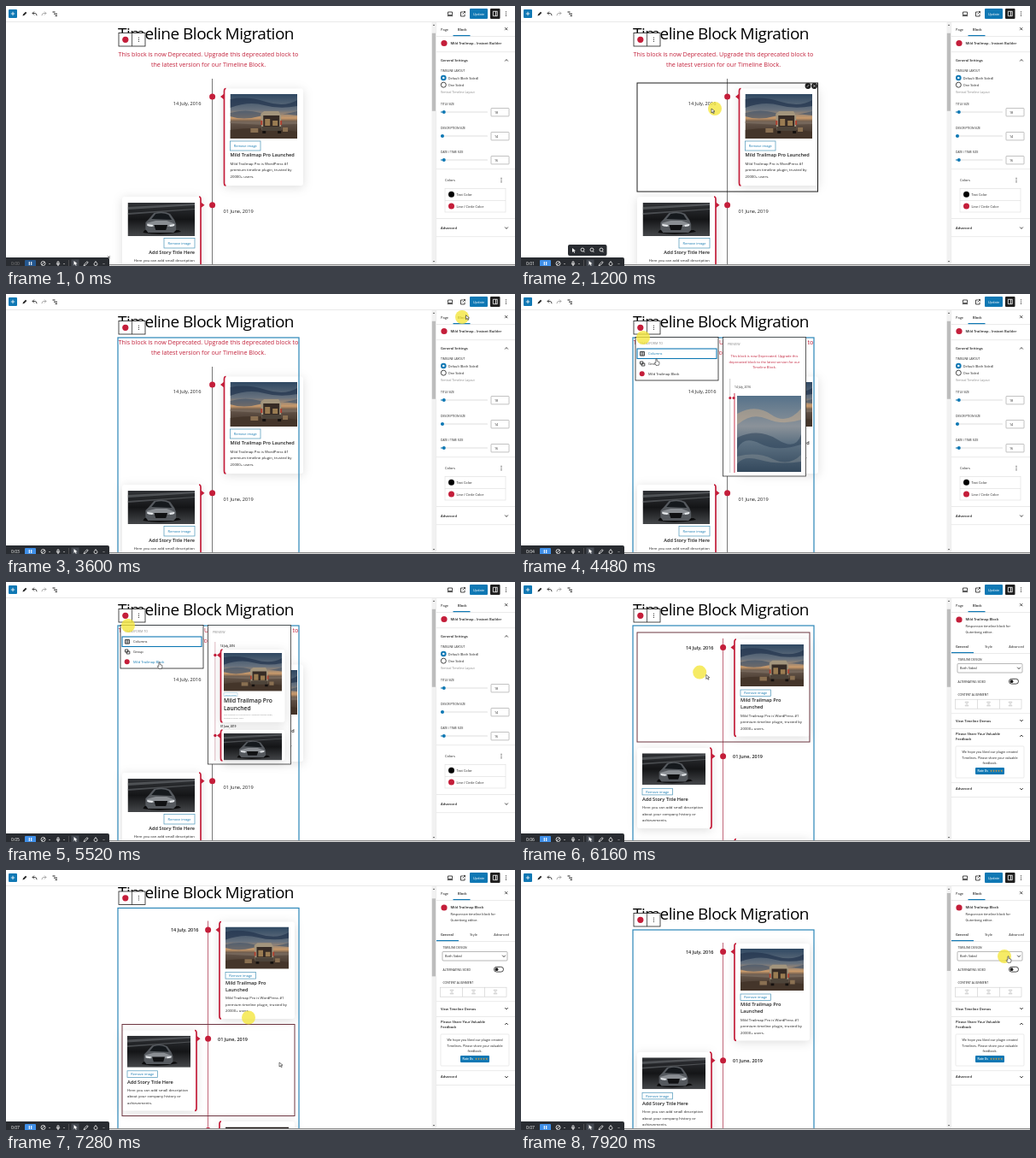
An HTML page for the animation above (8 s loop, 596x304 px).

```html
<!DOCTYPE html>
<html lang="en">
<head>
<meta charset="utf-8">
<title>Timeline Block Migration</title>
<style>
html, body { margin: 0; width: 100%; height: 100%; overflow: hidden; background: #fff; }
svg#stage { display: block; width: 596px; height: 304px; font-family: 'Open Sans', 'Noto Sans', sans-serif; fill: #1e1e1e; --scroll: 19px; }
text { white-space: pre; }
.b { font-weight: 600; }
.e { text-anchor: end; }
.m { text-anchor: middle; }
.red { fill: #c2203a; }
.blue { fill: #1178b0; }
.grey { fill: #858585; }
.white { fill: #fff; }
.line { fill: none; stroke: #1e1e1e; stroke-width: .8; }
.card { filter: drop-shadow(0 2px 6px #0002); }
.title { letter-spacing: -.5px; fill: #000; }
.page { transform: translateY(calc(0px - var(--scroll))); }
.tools { transform: translateY(max(23px, calc(50.5px - var(--scroll)))); }
.thumb { transform: translateY(calc(27px + var(--scroll) * .25)); }
</style>
</head>
<body>
<svg id="stage" viewBox="0 0 596 304">
  <defs>
    <clipPath id="canvas"><rect y="19" width="498.5" height="283"/></clipPath>
    <linearGradient id="dusk" x2="0" y2="1">
      <stop stop-color="#2f4862"/><stop offset=".35" stop-color="#66717e"/>
      <stop offset=".54" stop-color="#c99a6b"/><stop offset=".62" stop-color="#65564b"/>
      <stop offset="1" stop-color="#3a2c22"/>
    </linearGradient>
    <linearGradient id="cloud" x2="0" y2="1">
      <stop stop-color="#56728a"/><stop offset=".4" stop-color="#8b9299"/>
      <stop offset=".62" stop-color="#5d7182"/><stop offset="1" stop-color="#33485c"/>
    </linearGradient>
    <linearGradient id="garage" x2="0" y2="1">
      <stop stop-color="#303236"/><stop offset=".5" stop-color="#141517"/><stop offset="1" stop-color="#45474a"/>
    </linearGradient>
    <symbol id="van" viewBox="0 0 79 52" preserveAspectRatio="none">
      <rect width="79" height="52" fill="url(#dusk)"/>
      <path d="M0 6Q20 2 42 9T79 7V14Q58 18 40 13T0 16Z" fill="#25364f" opacity=".75"/>
      <path d="M0 22Q18 17 36 22T79 20V25Q52 21 34 26T0 26Z" fill="#46566a" opacity=".7"/>
      <path d="M0 32H79V35L40 36L0 34Z" fill="#75665a"/>
      <path d="M0 42Q30 37 79 44V52H0Z" fill="#44352a"/>
      <path d="M36 23L40 20H57L60 25V42H37Z" fill="#a3957d"/>
      <path d="M39 25H58V38H39Z" fill="#362b25"/>
      <path d="M41 29h6v8h-6zM50 31h6v6h-6z" fill="#9a7c52"/>
      <path d="M37 38H60V43H37Z" fill="#4d443a"/>
      <path d="M36 31h2v5h-2zM59 31h2v5h-2z" fill="#b0402f"/>
      <path d="M24 40h9v5h-9zM62 39h6v5h-6z" fill="#8a7052"/>
      <path d="M38 43h4v3h-4zM56 43h4v3h-4z" fill="#15110f"/>
    </symbol>
    <symbol id="car" viewBox="0 0 79 39" preserveAspectRatio="none">
      <rect width="79" height="39" fill="url(#garage)"/>
      <path d="M0 5L79 1V3L0 8ZM0 12L79 7V8L0 14Z" fill="#777a7f" opacity=".5"/>
      <path d="M18 35Q40 39 63 34L60 32H20Z" fill="#0b0b0c"/>
      <path d="M21 23L25 19L31 12Q42 9 50 13L55 20L57 25V32L54 35H24L21 31Z" fill="#55595e"/>
      <path d="M28 19L33 13Q42 11 48 14L52 20Z" fill="#15191d"/>
      <path d="M22 24L33 21H46L56 25L53 28H25Z" fill="#8a8e93"/>
      <path d="M31 26H47L45 32H33Z" fill="#101113"/>
      <path d="M23 25l7 1-1 2-6-1zM49 26l6-1v2l-5 1z" fill="#e6e9ec"/>
    </symbol>
    <symbol id="portrait" viewBox="0 0 74 37" preserveAspectRatio="none">
      <rect width="74" height="37" fill="#160f0d"/>
      <path d="M20 37Q22 12 38 10T55 37Z" fill="#4a281b"/>
      <ellipse cx="37" cy="27" rx="8" ry="11" fill="#7a4c37"/>
    </symbol>
  </defs>
</svg>
<script>
const INK = '#1e1e1e', BLUE = '#0f78b4', RED = '#c41e3a';

const text = (x, y, size, str, cls = '') => `<text x="${x}" y="${y}" font-size="${size}" class="${cls}">${str}</text>`;
const lines = (x, y, step, size, rows, cls) => rows.map((row, i) => text(x, y + i * step, size, row, cls)).join('');
const rect = (x, y, w, h, fill = 'none', extra = '') => `<rect x="${x}" y="${y}" width="${w}" height="${h}" fill="${fill}" ${extra}/>`;
const frame = (x, y, w, h, color = INK, width = .8, extra = '') => rect(x, y, w, h, '#fff', `stroke="${color}" stroke-width="${width}" ${extra}`);
const outline = (x, y, w, h, color = INK, width = 1) => rect(x, y, w, h, 'none', `stroke="${color}" stroke-width="${width}"`);
const dot = (x, y, r, fill = INK, extra = '') => `<circle cx="${x}" cy="${y}" r="${r}" fill="${fill}" ${extra}/>`;
const path = (d, extra = 'class="line"') => `<path d="${d}" ${extra}/>`;
const image = (id, x, y, w, h) => `<use href="#${id}" x="${x}" y="${y}" width="${w}" height="${h}"/>`;
const rule = y => rect(504, y, 92, .6, '#ddd');
const chevron = (x, y, dir = 1) => path(`M${x - 1.8} ${y - dir}l1.8 ${2 * dir}l1.8 ${-2 * dir}`);
const kebab = (x, y) => [-2.2, 0, 2.2].map(d => dot(x, y + d, .6)).join('');
const mark = (x, y) => dot(x, y, 3.6, RED);
const at = (x, y, body) => `<g transform="translate(${x} ${y})">${body}</g>`;
// Visible between two percentages of the loop
const show = (from, to, body) => `<g data-show="${from} ${to}">${body}</g>`;

// side 1 puts the accent on the left edge, -1 on the right edge
function card(x, y, w, h, side, tipY) {
  const edge = side > 0 ? x : x + w;
  return rect(x, y, w, h, '#fff', 'rx="3" class="card"') +
    path(`M${edge + 2 * side} ${y}q${-2 * side} 0 ${-2 * side} 3v${h - 6}q0 3 ${2 * side} 3`, `fill="none" stroke="${RED}" stroke-width="1.7"`) +
    path(`M${edge} ${tipY - 3.5}l${-4.5 * side} 3.5l${4.5 * side} 3.5z`, `fill="${RED}"`);
}
const button = (x, y, w, h) => frame(x, y, w, h, '#4b94b8', .7) + text(x + w / 2, y + h / 2 + 1.4, 3.95, 'Remove image', 'm blue');

const proText = ['Mild Trailmap Pro is WordPress #1', 'premium timeline plugin, trusted by', '20000+ users.'];
const storyText = ['Here you can add small description', 'about your company history or', 'achievements.'];

const oldBlock =
  lines(237, 59, 11.8, 7.15, ['This block is now Deprecated. Upgrade this deprecated block to', 'the latest version for our Timeline Block.'], 'm red') +
  rect(241.2, 85, .8, 240, '#555') +
  dot(241.6, 106, 3.5, RED) + text(228.5, 115.5, 5.65, '14 July, 2016', 'e') +
  card(255.5, 96.5, 92.5, 113.5, 1, 106) + image('van', 262.5, 103, 78.5, 52) + button(262.5, 158, 35.5, 11) +
  text(262.5, 176, 5.6, 'Mild Trailmap Pro Launched', 'b') + lines(262.5, 185.8, 7.6, 4.3, proText) +
  dot(241.6, 232.8, 3.5, RED) + text(254.5, 242, 5.65, '01 June, 2019') +
  card(136, 223, 92, 100, -1, 232.8) + image('car', 142.5, 230, 78.5, 39) + button(185, 271.5, 36, 11.5) +
  text(221, 290, 5.6, 'Add Story Title Here', 'b e') + lines(221, 299, 7.6, 4.35, storyText, 'e') +
  show(12, 19, outline(136, 90, 211.5, 127) + dot(336, 93.5, 3.4) + dot(343.5, 93.5, 3.4) +
    path('M334.8 94.7l2.4-2.4M342.3 92.3l2.4 2.4m0-2.4l-2.4 2.4', 'stroke="#fff" stroke-width=".7"'));

const newBlock =
  rect(236.1, 85, .9, 320, '#b9566b') +
  dot(236.6, 95.5, 3.5, RED) + text(225.5, 97.5, 5.5, '14 July, 2016', 'b e') +
  card(250, 86, 88, 113.5, 1, 95.5) + image('van', 257, 92, 74, 49) + button(257, 145, 35.5, 7.6) +
  lines(257, 159.3, 7.9, 5.6, ['Mild Trailmap Pro', 'Launched'], 'b') + lines(257, 176.8, 7.5, 4.3, proText) +
  dot(236.6, 222.8, 3.5, RED) + text(248, 225, 5.5, '01 June, 2019', 'b') +
  card(136, 213, 87, 94, -1, 222.8) + image('car', 142, 219.3, 74, 37) + button(142, 260.3, 35.5, 7.6) +
  text(142, 275.2, 5.6, 'Add Story Title Here', 'b') + lines(142, 284, 7.5, 4.35, storyText) +
  dot(236.6, 330, 3.5, RED) + text(225.5, 332, 5.5, '11/Oct/2000', 'b e') +
  card(250, 319.5, 88, 100, 1, 330) + image('portrait', 257, 326, 74, 37) +
  show(76, 90, outline(136, 78, 202, 128, '#6d3641')) + show(90, 95, outline(136, 206, 202, 107, '#6d3641'));

const canvas = `<g clip-path="url(#canvas)"><g class="page">` +
  text(131, 58.4, 19, 'Timeline Block Migration', 'title') +
  show(0, 72, at(0, 19, oldBlock)) + show(72, 100, newBlock) +
  show(21, 100, outline(131, 70, 212, 400, '#2b86b8', 1.2)) + `</g>
  <g class="tools">` + frame(132, 0, 31, 15.5) + rect(147.3, 0, .7, 15.5, INK) + mark(139.8, 7.8) + kebab(155.5, 7.8) + `</g></g>`;

const scrollbar = rect(498.5, 19, 5, 283, '#f1f1f1') + `<g class="thumb">${rect(498.8, 0, 4.2, 91, '#bdbdbd')}</g>` +
  path('M499.8 23l1.2-1.6l1.2 1.6zM499.8 298l1.2 1.6l1.2-1.6z', 'fill="#555"') + rect(503.6, 19, .6, 283, '#ddd');

const header = rect(0, 0, 596, 18.5, '#fff') + rect(0, 18.4, 596, .6, '#ddd') +
  rect(3, 4, 10, 10, BLUE, 'rx="1"') + path('M8 6.8v4.4M5.8 9h4.4', 'stroke="#fff" stroke-width=".8"') +
  path('M19.5 11.5l.5-1.8l3-3l1.3 1.3l-3 3z', `fill="${INK}"`) +
  path('M33 6.5l-2 2l2 2M31 8.5h3q2 0 2 2.8') + path('M45 6.5l2 2l-2 2M47 8.5h-3q-2 0-2 2.8', 'fill="none" stroke="#999" stroke-width=".8"') +
  path('M54.5 7h3M56 9.2h4M57.5 11.4h2.5', `stroke="${INK}" stroke-width="1"`) +
  path('M517.5 7h5v3.6h-5zM516.8 11.6h6.4') + path('M535 7h-2.5v5h4.6v-2.4M534.6 9.4l2.8-2.8M535.5 6.4h2v2') +
  rect(543, 3, 21, 12, BLUE, 'rx="1"') + text(553.5, 10.6, 4, 'Update', 'm white') +
  rect(567, 3, 11.5, 12, INK, 'rx="1"') + path('M570.3 6.3h5v5.4h-5zM573.5 6.3v5.4', 'fill="none" stroke="#fff" stroke-width=".8"') + kebab(585.5, 9);

const slider = (y, label, knob, value) => text(509, y, 3.4, label) +
  rect(509, y + 8, 55, 1, '#ddd', 'rx=".5"') + rect(509, y + 8, knob - 509, 1, BLUE) + dot(knob, y + 8.5, 2, BLUE) +
  frame(568, y + 4, 21, 9.4, '#999', .6, 'rx=".6"') + text(572, y + 10.1, 3.7, value);

const oldPanel = mark(513, 43.5) + text(520.5, 45, 4.1, 'Mild Trailmap - Instant Builder', 'b') + rule(53.5) +
  text(509, 65, 4, 'General Settings', 'b') + chevron(586, 63.5, -1) +
  text(509, 77, 3.4, 'TIMELINE LAYOUT') +
  dot(512.3, 84, 3.3, BLUE) + dot(512.3, 84, 1.3, '#fff') + text(517.8, 85.5, 3.8, 'Default (Both Sided)') +
  dot(512.3, 92.2, 3, 'none', 'class="line"') + text(517.8, 93.7, 3.8, 'One Sided') +
  text(509, 102, 3.6, 'Vertical Timeline Layout', 'grey') +
  slider(115.5, 'TITLE SIZE', 512.8, '18') + slider(143.5, 'DESCRIPTION SIZE', 511, '14') + slider(171.5, 'DATE / TIME SIZE', 512.8, '16') +
  rule(190.5) + text(514, 205, 4, 'Colors') + kebab(580, 203.5) +
  frame(514, 213.5, 71, 27.5, '#ddd', .6) + rect(514, 227, 71, .6, '#ddd') +
  dot(521.5, 220.3, 3.5, '#000') + text(527.5, 222, 3.9, 'Text Color') +
  dot(521.5, 234, 3.5, RED) + text(527.5, 235.5, 3.9, 'Line / Circle Color') +
  rule(248) + text(509, 261, 4, 'Advanced', 'b') + chevron(586, 259.5) + rule(269.5);

const alignIcon = x => path(`M${x - 2.2} 140.5h4.4M${x - 1.4} 142.6h2.8M${x - 2.2} 144.7h4.4`, 'stroke="#aaa" stroke-width=".7"');
const newPanel = mark(513, 44) + text(520.5, 45.3, 4.1, 'Mild Trailmap Block', 'b') +
  lines(520.5, 53, 6.7, 3.85, ['Responsive timeline block for', 'Gutenberg editor.']) +
  text(509, 76.7, 3.9, 'General', 'b') + text(547.5, 76.7, 3.9, 'Style', 'm') + text(589, 76.7, 3.9, 'Advanced', 'e') +
  rule(83) + rect(504, 82, 26, 1.2, BLUE) +
  text(511.5, 92, 3.4, 'TIMELINE DESIGN') + frame(511, 95.5, 76, 10.5, '#888', .6, 'rx="1"') + text(514, 102.2, 3.9, 'Both Sided') + chevron(583, 100.7) +
  text(511.5, 117.5, 3.4, 'ALTERNATING SIDED') + frame(571.5, 113.3, 11, 5.8, INK, .8, 'rx="2.9"') + dot(574.5, 116.2, 1.9) +
  text(511.5, 133, 3.4, 'CONTENT ALIGNMENT') + frame(508.5, 137.2, 77.5, 11, '#ccc', .6) +
  rect(534.3, 137.2, .6, 11, '#ccc') + rect(560.2, 137.2, .6, 11, '#ccc') + [522, 547.5, 573].map(alignIcon).join('') +
  rule(153.5) + text(509, 163.7, 4, 'View Timeline Demos', 'b') + chevron(586, 162) + rule(171) +
  lines(509, 179.2, 6, 4, ['Please Share Your Valuable', 'Feedback'], 'b') + chevron(586, 180, -1) +
  frame(509, 192, 80, 37, '#ddd', .6, 'rx="1"') +
  lines(549, 200.4, 6.2, 3.75, ['We hope you liked our plugin created', 'Timelines. Please share your valuable', 'feedback.'], 'm') +
  rect(532, 217, 34, 8, BLUE, 'rx="1"') + text(534.5, 222.3, 3.4, 'Rate Us', 'b white') +
  `<text x="549" y="222.3" font-size="3.4" fill="#f5a030" font-family="DejaVu Sans, sans-serif">★★★★★</text>` +
  rule(234.5) + text(509, 243.4, 4, 'Advanced', 'b') + chevron(586, 242) + rule(251);

const panel = rect(504.2, 19, 92, 283, '#fff') + text(509, 28.5, 4, 'Page') + text(529, 28.5, 4, 'Block', 'b') +
  path('M584.2 25.2l3 3m0-3l-3 3') + rule(35) + rect(523.5, 34, 20, 1.2, BLUE) +
  show(0, 72, oldPanel) + show(72, 100, newPanel);

const menuItem = (y, label, from, to) => text(149, y, 4, label) + show(from, to, rect(148, y - 4, 55, 5.5, '#fff') + text(149, y, 4, label, 'blue'));
const menu = frame(134, 50.5, 97, 50.5) + text(139, 58.7, 3.6, 'TRANSFORM TO', 'grey') +
  path('M139.5 67.5h5v4.6h-5zM141.2 67.5v4.6M142.9 67.5v4.6') + path('M139.5 79h3.4v3h-3.4zM141.2 81h3.6v3h-3.6z') +
  dot(141.7, 93.2, 3, RED) +
  menuItem(71.4, 'Columns', 53, 60) + menuItem(83.2, 'Group', 60, 64) + menuItem(94.8, 'Mild Trailmap Block', 64, 72) +
  outline(136, 64, 93, 11.5, BLUE, 1.1);

const columnsPreview =
  lines(285, 74, 6.6, 3.95, ['This block is now Deprecated. Upgrade this', 'deprecated block to the latest version for our', 'Timeline Block.'], 'm red') +
  text(250, 110, 3.3, '14 July, 2016') + rect(244.6, 99, .5, 110, '#999') + rect(249.5, 116, .9, 93, RED) +
  dot(244.8, 121.5, 1.5, RED) + dot(249, 121.5, 1.5, RED) +
  rect(253, 119, 75, 89, 'url(#cloud)') +
  path('M253 140Q275 128 293 141T328 134V147Q306 154 288 146T253 153Z', 'fill="#d2b28c" opacity=".45"') +
  path('M253 168Q278 156 300 170T328 164V176Q300 185 280 175T253 182Z', 'fill="#263d54" opacity=".5"') +
  path('M253 190Q276 184 295 193T328 188V196Q300 200 280 194T253 199Z', 'fill="#91999c" opacity=".4"');

const blockPreview =
  rect(244.6, 70, .6, 139, '#c78794') + text(251, 76, 2.9, '14 July, 2016', 'b') + dot(244.9, 85.5, 1.7, RED) +
  card(251.5, 79, 75, 85, 1, 85.5) + image('van', 255, 83, 68, 44.5) +
  frame(255, 129.8, 16, 3.7, '#75adc8', .4) + text(263, 132.6, 1.9, 'Remove image', 'm blue') +
  lines(255, 141.3, 8.6, 6.7, ['Mild Trailmap Pro', 'Launched'], 'b') +
  lines(255, 156, 3.7, 2.05, ['Mild Trailmap Pro is WordPress #1 premium timeline plugin,', 'trusted by 20000+ users.'], 'grey') +
  text(251, 169.8, 2.9, '01 June, 2019', 'b') + dot(244.9, 179.5, 1.7, RED) +
  card(251.5, 173, 75, 36, 1, 179.5) + image('car', 255, 177, 68, 31.5);

const popover = show(52, 72, menu +
  frame(236.5, 50.5, 97, 162.5, '#333') + text(242, 60, 3.5, 'PREVIEW', 'grey') +
  show(52, 64, columnsPreview) + show(64, 72, blockPreview));

const icon = (d, color = '#e4e4e4') => path(d, `fill="none" stroke="${color}" stroke-width=".9"`);
const arrow = 'l0 5l1.3-1.2l1 2l.9-.5l-1-1.9l1.8-.2z';
const recorder = rect(0, 302.3, 596, .9, '#555') + rect(-3, 294, 124, 12, '#292c31', 'rx="2"') +
  show(0, 1, text(6, 302.7, 5, '0:00', 'grey') + rect(22, 297, 13, 8, '#24578f', 'rx="1"') + path('M119.2 292.4l2.4 2.4m0-2.4l-2.4 2.4')) +
  show(1, 100, rect(22, 297, 13, 8, '#3f8fe8', 'rx="1"') + '<text id="clock" x="6" y="302.7" font-size="5" class="white"></text>') +
  path('M27.3 299v4M29.7 299v4', 'stroke="#fff" stroke-width="1.1"') +
  icon('M41 301a2.5 2.5 0 1 0 5 0a2.5 2.5 0 1 0-5 0M42 303l3-4') + icon('M60 299v2.5h2v-2.5zM59 301q2 4 4 0M61 303v1') +
  icon('M50 301l1 1l1-1M67 301l1 1l1-1M113.5 301l1 1l1-1', '#999') + rect(73, 297, .6, 7, '#666') +
  rect(76.5, 296.5, 9, 8, '#444951') + path('M79.5 298' + arrow, 'fill="#fff"') + icon('M91 304l1-2.3l3-3l1.2 1.2l-3 3z') + icon('M105 298.5l2 3a2 2 0 1 1-4 0z') +
  show(1, 19, rect(55, 279, 45.5, 13, '#292c31', 'rx="2"') + path('M60 283' + arrow, 'fill="#fff"') +
    [72, 83, 94].map(x => icon(`M${x - 2} 285a2 2 0 1 0 4 0a2 2 0 1 0-4 0M${x + 1} 286.5l1.5 1.5`)).join(''));

const arrowCursor = path('M0 0' + arrow, 'fill="#fff" stroke="#222" stroke-width=".6"');
const handCursor = path('M0 0q1-.7 1.2.3v2.2l2.6.8q.6 2.2-.5 4h-3.3l-1.9-2.6q.3-1 1.6 0z', 'fill="#fff" stroke="#222" stroke-width=".6"');
const pointer = show(1, 100, dot(0, 0, 8, '#f3e53a', 'id="halo" fill-opacity=".78"') +
  `<g id="cursor">${show(0, 52, arrowCursor)}${show(52, 72, handCursor)}${show(72, 95, arrowCursor)}${show(95, 100, handCursor)}</g>`);

const stage = document.getElementById('stage');
stage.insertAdjacentHTML('beforeend', canvas + scrollbar + panel + header + popover + recorder + pointer);

// Waypoints: percentage of the loop, then the value or position
const scrollTrack = [[0, 19], [84, 19], [88, 51], [89, 51], [93, 0], [100, 0]];
const cursorTrack = [
  [0, 118, 288], [7, 514, 43], [9, 514, 43], [13, 240, 112], [14, 227, 120], [15, 223, 120], [17, 223, 120],
  [22, 516, 82], [27, 576, 123], [31, 534, 131], [34, 533, 131], [42, 534, 27], [44, 534, 27], [48, 552, 18],
  [52, 143, 51], [56, 158, 76], [62, 160, 83], [66, 174, 92], [69, 179, 94], [72, 179, 94],
  [81, 247, 120], [89, 248, 120], [91, 320, 225], [94, 506, 70], [96, 534, 34], [98, 566, 101], [100, 574, 101],
];

function valueAt(track, p) {
  const i = Math.max(1, track.findIndex(([at]) => at >= p));
  const [start, ...from] = track[i - 1], [end, ...to] = track[i];
  const k = (p - start) / (end - start);
  return from.map((v, n) => v + (to[n] - v) * k);
}

const STEP = 80, STEPS = 100, TOLERANCE = 20;
const groups = [...document.querySelectorAll('[data-show]')].map(el => [el, ...el.dataset.show.split(' ').map(Number)]);
const clock = document.getElementById('clock');
const move = (id, [x, y]) => document.getElementById(id).setAttribute('transform', `translate(${x} ${y})`);
const began = performance.now();

function draw() {
  const p = Math.floor((performance.now() - began + TOLERANCE) / STEP) % STEPS;
  for (const [el, from, to] of groups) el.style.display = p >= from && p < to ? '' : 'none';
  clock.textContent = `0:0${Math.floor(p * STEP / 1000)}`;
  stage.style.setProperty('--scroll', `${valueAt(scrollTrack, p)}px`);
  move('cursor', valueAt(cursorTrack, p));
  // The halo trails by one step and stays where the menu was clicked
  const pinned = p >= 52 && p < 72;
  move('halo', valueAt(cursorTrack, pinned ? 52 : Math.max(0, p - 1)));
  requestAnimationFrame(draw);
}
draw();
</script>
</body>
</html>
```
